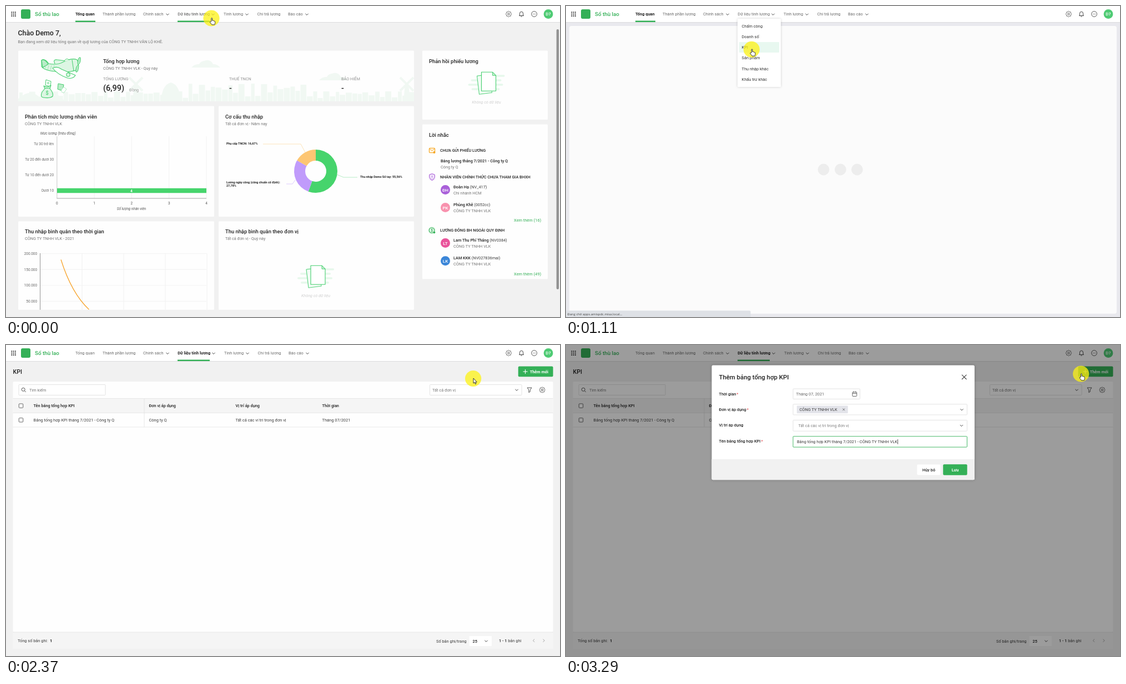
An HTML page with a canvas that plays this animation: 998 px wide and 561 px high, repeating every 3.33 s.

```html
<!DOCTYPE html>
<html lang="vi">
<head>
<meta charset="utf-8">
<title>KPI</title>
<style>
html, body { margin: 0; width: 100%; height: 100%; overflow: hidden; background: #f1f1f1; }
canvas { display: block; width: 998px; height: 561px; }
</style>
</head>
<body>
<canvas id="stage"></canvas>
<script>
const W = 998, H = 561, LOOP = 3330;
const canvas = document.getElementById('stage');
const c = canvas.getContext('2d');
const dpr = window.devicePixelRatio || 1;
canvas.width = W * dpr;
canvas.height = H * dpr;

const GREEN = '#34b057', INK = '#222', BODY = '#3c3c3c', GRAY = '#757575', LINE = '#e2e2e2';
const FACE = 'Roboto, "Noto Sans", sans-serif';
const COMPANY = 'CÔNG TY TNHH VLK', BRANCH = 'Công ty Q';

// y is the middle of the capital letters; returns the width
function text(s, x, y, size = 7.4, color = BODY, weight = 400, align = 'left', style = '', face = FACE) {
  c.font = `${style} ${weight} ${size}px ${face}`;
  c.textAlign = align;
  c.fillStyle = color;
  c.fillText(s, x, y + size * .355);
  return c.measureText(s).width;
}
function box(x, y, x2, y2, fill, r = 0, stroke, lw = .8) {
  c.beginPath();
  c.roundRect(x, y, x2 - x, y2 - y, r);
  if (fill) { c.fillStyle = fill; c.fill(); }
  if (stroke) { c.strokeStyle = stroke; c.lineWidth = lw; c.stroke(); }
}
function disc(x, y, r, fill, stroke, lw = 1) {
  c.beginPath();
  c.arc(x, y, r, 0, Math.PI * 2);
  if (fill) { c.fillStyle = fill; c.fill(); }
  if (stroke) { c.strokeStyle = stroke; c.lineWidth = lw; c.stroke(); }
}
function line(color, lw, ...p) {
  c.beginPath();
  for (let i = 0; i < p.length; i += 2) c.lineTo(p[i], p[i + 1]);
  c.strokeStyle = color;
  c.lineWidth = lw;
  c.stroke();
}
function shape(d, x, y, fill, stroke, lw = 1) {
  c.save();
  c.translate(x, y);
  const p = new Path2D(d);
  if (fill) { c.fillStyle = fill; c.fill(p); }
  if (stroke) { c.strokeStyle = stroke; c.lineWidth = lw; c.lineJoin = 'round'; c.stroke(p); }
  c.restore();
}
const chevron = (x, y, color = '#444') => line(color, 1, x - 2.6, y - 1.2, x, y + 1.4, x + 2.6, y - 1.2);
const cross = (x, y, r, color, lw) => {
  line(color, lw, x - r, y - r, x + r, y + r);
  line(color, lw, x - r, y + r, x + r, y - r);
};
function gear(x, y) {
  c.beginPath();
  for (let i = 0; i <= 64; i++) {
    const a = i / 64 * Math.PI * 2, r = 4.6 + .5 * Math.cos(8 * a);
    c.lineTo(x + r * Math.cos(a), y + r * Math.sin(a));
  }
  c.strokeStyle = '#444';
  c.lineWidth = .9;
  c.stroke();
  disc(x, y, 1.7, null, '#444', .9);
}

function header(kpi, hover) {
  box(0, 0, W, 29, '#fff');
  box(0, 29, W, 30, '#dcdcde');
  for (let i = 0; i < 9; i++) disc(10.3 + i % 3 * 3.3, 11.3 + (i / 3 | 0) * 3.3, 1.1, '#333');
  box(27, 6, 44, 23, GREEN, 3);
  text('Sổ thù lao', 52, 14.5, 9.8, GREEN, 500);
  const nav = [
    ['Tổng quan', 125], ['Thành phần lương', 174], ['Chính sách', 247, 291],
    ['Dữ liệu tính lương', 309.3, 373], ['Tính lương', 392, 434],
    ['Chi trả lương', 452.5], ['Báo cáo', 508, 542]
  ];
  const active = kpi ? 3 : 0;
  nav.forEach(([s, x, arrow], i) => {
    const dx = kpi && i > 3 ? 1 : 0, on = i === active;
    text(s, x + dx, 14.7, 7.4, on ? INK : hover && i === 3 ? '#444' : '#6b6b6b', on ? 700 : 400);
    if (arrow) chevron(arrow + (kpi && i > 2 ? 1 : 0), 15);
  });
  if (kpi || hover) box(309, 26.6, 367, 29, GREEN);
  if (!kpi) box(125, 26.6, 161, 29, GREEN);
  gear(905.5, 14.5);
  shape('M-4 3H4L3 1.5V-1.2A3 3 0 0 0-3-1.2V1.5ZM-1 4.6H1', 928.5, 14.5, null, '#444', 1);
  disc(951.5, 14.5, 4.9, null, '#444', .9);
  for (const d of [-2, 0, 2]) disc(951.5 + d, 14.5, .6, '#444');
  disc(977, 14.5, 8.4, '#4fcb74');
  text('D7', 977, 14.8, 7.6, '#fff', 500, 'center');
}

function skyline() {
  const tint = '#f1f8f3';
  c.save();
  c.beginPath();
  c.rect(22, 81, 713, 91);
  c.clip();
  for (let x = 24, i = 0; x < 735; i++) {
    const w = 6 + 5 * Math.abs(Math.sin(i * 2.3)), tall = x > 320 && x < 540 ? 26 : 12;
    box(x, 166 - tall * Math.abs(Math.sin(i * 1.7 + 1)), x + w, 172, tint);
    x += w + 1;
  }
  shape('M-18 32Q-16 2 0-2Q16 2 18 32Z', 297, 140, tint);
  shape('M-42 12Q-20-14 0 4Q26-14 46 12Z', 60, 160, tint);
  for (const [x, y] of [[360, 109], [590, 132]])
    shape('M-26 2H26Q20-5 13-4Q8-14-3-10Q-10-9-12-4Q-20-5-26 2Z', x, y, tint);
  for (const x of [234, 722]) {
    shape('M-3 0L-6 32H6L3 0Z', x, 140, tint);
    cross(x, 141, 12, tint, 4);
  }
  c.restore();
}

function plane() {
  const edge = '#43ce6d', pale = '#dcf6e3';
  shape('M64 98Q70 94 77 104Q92 107 103 101Q119 93 128 97Q134 107 126 116Q109 121 88 118Q68 116 64 109Z', 0, 0, pale, edge, 1.1);
  shape('M64 98Q69 94 76 105L66 111Z', 0, 0, '#b9ecc8', edge, 1.1);
  shape('M84 112Q92 108 100 114L125 125Q121 132 111 130Q93 124 84 112Z', 0, 0, '#fff', edge, 1.1);
  shape('M88 104Q84 96 92 97L108 99', 0, 0, pale, edge, 1.1);
  shape('M105 100Q107 93 114 97', 0, 0, '#fff', edge, 1);
  disc(112, 124, 3.2, pale, edge, 1.1);
  for (let i = 0; i < 4; i++) line('#a8e6ba', 1, 72 + i * 5, 107, 70 + i * 5, 115);
  line(edge, 1, 119, 97, 122, 117);
  shape('M0 0Q5-3 4-13Q0-15-1-3ZM0 0Q-5 4-4 13Q0 15 1 2Z', 130, 106, '#b9ecc8', edge, 1);
  shape('M71 143L72 133L81 136L80 145Z', 0, 0, '#fff', edge, 1);
  disc(76, 139, 1.5, null, edge, .8);
  shape('M68 144Q74 148 81 143L79 149Q86 157 84 163Q79 167 67 165Q61 164 65 155L70 149Z', 0, 0, pale, edge, 1.1);
  line(edge, 1, 70, 148.5, 80, 148);
  text('$', 74, 157, 9, edge, 500, 'center');
  shape('M94 140L104 142L102 153L93 150Z', 0, 0, '#b9ecc8', edge, 1);
  shape('M104 146L109 150L104 157L99 154', 0, 0, '#fff', '#a8e6ba', .9);
}

function empty(x, y) {
  const bars = [[-17, 33, -13], [-28, 27, -5], [-33, 30, 3], [-27, 24, 11]];
  for (const [a, b, d] of bars) box(x + a, y + d - 2, x + b, y + d + 1.5, '#e6f8eb', 2);
  shape('M-17-13L6-16L10 17L-13 20Z', x, y, '#f2fcf5', '#55d37c', 1.1);
  shape('M-9-20H11L17-14V14H-9Z', x, y, '#fff', '#43ce6d', 1.1);
  shape('M11-20V-14H17Z', x, y, '#c6f0d2', '#43ce6d', .9);
  text('Không có dữ liệu', x, y + 34.5, 7.2, '#cfcfcf', 400, 'center', 'italic');
}

function card(x, y, x2, y2, title, sub) {
  box(x, y, x2, y2, '#fefefe', 1.5);
  text(title, x + 12, y + 18.7, 9.4, INK, 500);
  if (sub) text(sub, x + 12, y + 31.6, 7.28, GRAY);
}

function barChart() {
  card(22, 180.5, 375, 380, 'Phân tích mức lương nhân viên', COMPANY);
  text('Mức lương (triệu đồng)', 62, 230, 6.4, '#555', 400, 'left', 'italic');
  for (let i = 0; i < 5; i++) {
    const x = 91.8 + i * 67.3;
    line(i ? '#efefef' : '#bbb', .8, x, 235, x, 347);
    text(i, x, 355.8, 6.4, '#555', 400, 'center');
  }
  line('#999', .9, 91.5, 347, 361, 347);
  ['Từ 30 trở lên', 'Từ 20 đến dưới 30', 'Từ 10 đến dưới 20', 'Dưới 10'].forEach((s, i) =>
    text(s, 86, 249 + i * 28, 6.4, '#666', 400, 'right'));
  box(92, 328.8, 361, 337.3, '#46d46c');
  text('4', 226, 333.2, 6.6, '#fff', 700, 'center');
  text('Số lượng nhân viên', 226, 366, 6.4, '#555', 400, 'center', 'italic');
}

function donut() {
  card(383, 180.5, 735, 380, 'Cơ cấu thu nhập', 'Tất cả đơn vị - Năm nay');
  const cx = 558, cy = 298, turn = Math.PI * 2;
  let a = -Math.PI / 2;
  for (const [part, color] of [[.5556, '#46d46c'], [.2778, '#c09bfb'], [.1666, '#fdc673']]) {
    const b = a + part * turn;
    c.beginPath();
    c.arc(cx, cy, 39, a, b);
    c.arc(cx, cy, 19, b, a, true);
    c.fillStyle = color;
    c.fill();
    a = b;
  }
  line('#a5e8b7', .8, 596, 304, 608, 309, 633, 309);
  line('#d4bdfb', .8, 521, 314, 516, 321, 505, 321);
  line('#fbdca8', .8, 539, 264, 531, 249, 463, 249);
  text('Thu nhập Demo Sổ tay: 55,56%', 638, 308, 5.45, INK, 700);
  text('Phụ cấp TNCN: 16,67%', 397, 248.3, 5.45, INK, 700);
  text('Lương ngày công (công chuẩn cố định):', 397, 317.7, 5.45, INK, 700);
  text('27,78%', 397, 323.7, 5.45, INK, 700);
}

function lineChart() {
  card(22, 388.3, 375, 548, 'Thu nhập bình quân theo thời gian', COMPANY + ' - 2021');
  for (let i = 0; i < 4; i++) {
    const y = 446.6 + i * 28.7;
    line('#efefef', .8, 62, y, 361, y);
    text((200 - i * 50) + '.000', 56, y, 6.4, '#666', 400, 'right');
    line('#efefef', .8, 137 + i * 75, 446, 137 + i * 75, 548);
  }
  line('#888', .9, 61.5, 446, 61.5, 548);
  shape('M99 457.5Q118 518 149.5 547.5', 0, 0, null, '#f7a32a', 1.3);
}

function person(y, initials, color, name, code, sub) {
  disc(791.5, y, 8.5, color);
  text(initials, 791.5, y + .3, 8, '#fff', 500, 'center');
  const w = text(name + ' ', 806, y - 4.8, 7.3, INK, 500);
  text(`(${code})`, 806 + w, y - 4.8, 7.3, BODY);
  text(sub, 806, y + 6.2, 7.3, GRAY);
}

function reminders() {
  card(750, 213.5, 976, 492.5, 'Lời nhắc');
  disc(767.5, 260.5, 7, '#fff7e8');
  box(762.5, 256.5, 772.5, 264.5, null, 1, '#f5a623', 1.1);
  line('#f5a623', 1, 763, 257.5, 767.5, 261, 772, 257.5);
  disc(771.5, 264, 2, '#f5a623');
  disc(767.5, 308.5, 7, '#f5ecfb');
  shape('M-4.5-4L0-5.5L4.5-4V0Q4 4 0 6Q-4 4-4.5 0ZM0-2.5V1M0 2V3', 767.5, 308.3, null, '#a95fd8', 1.1);
  disc(767.5, 405, 7, '#e6f8eb');
  disc(767, 404.5, 4.8, null, '#34b057', 1.1);
  text('$', 767, 404.6, 6.5, GREEN, 700, 'center');
  disc(771.5, 408.5, 1.8, GREEN);
  text('CHƯA GỬI PHIẾU LƯƠNG', 782, 260.3, 7.25, INK, 500);
  text('Bảng lương tháng 7/2021 - ' + BRANCH, 783, 279.8, 7.3, INK, 500);
  text(BRANCH, 783, 290.7, 7.3, GRAY);
  text('NHÂN VIÊN CHÍNH THỨC CHƯA THAM GIA BHXH', 782, 308.3, 7.25, INK, 500);
  person(331.5, 'ĐH', '#a960d9', 'Đoàn Hạ', 'NV_417', 'Chi nhánh HCM');
  person(363.5, 'PK', '#f892ae', 'Phùng Khê', '0052cc', COMPANY);
  text('Xem thêm (16)', 964, 386.7, 7.4, GREEN, 400, 'right');
  text('LƯƠNG ĐÓNG BH NGOÀI QUY ĐỊNH', 782, 404.5, 7.25, INK, 500);
  person(427.5, 'LT', '#e9549b', 'Lam Thu Phí Tháng', 'NV0384', COMPANY);
  person(459.7, 'LK', '#3b86d8', 'LAM KKK', 'NV027836mai', COMPANY);
  text('Xem thêm (49)', 964, 483, 7.4, GREEN, 400, 'right');
}

function dashboard() {
  box(0, 0, W, H, '#f1f1f1');
  text('Chào Demo 7,', 21.5, 48.8, 12.4, INK, 500);
  text('Bạn đang xem dữ liệu tổng quan về quỹ lương của CÔNG TY TNHH VÂN LỘ KHÊ.', 21.5, 64.8, 7.35, GRAY);
  box(22, 80.5, 735, 172, '#fefefe', 1.5);
  skyline();
  plane();
  text('Tổng hợp lương', 175, 99.7, 9.4, INK, 500);
  text(COMPANY + ' - Quý này', 175, 112.3, 7.28, GRAY);
  [['TỔNG LƯƠNG', 175], ['THUẾ TNCN', 402], ['BẢO HIỂM', 604]].forEach(([s, x], i) => {
    text(s, x, 131.5, 7.3, '#909090');
    text(i ? '-' : '(6,99)', x, 148.3, 14.5, INK, 500);
  });
  text('Đồng', 222, 151, 7.3, '#a0a0a0');
  barChart();
  donut();
  lineChart();
  card(383, 388.3, 735, 548, 'Thu nhập bình quân theo đơn vị', 'Tất cả đơn vị - Quý này');
  empty(558, 488.3);
  card(750, 80.5, 976, 205, 'Phản hồi phiếu lương');
  empty(865.5, 139.3);
  reminders();
  box(991.6, 42, 996, 511, '#929292', 2);
}

function loading() {
  box(0, 0, W, H, '#e9e9ee');
  box(6, 36, 992, 555, '#fbfbfb', 4);
  for (const x of [464, 494.4, 524.4]) disc(x, 295, 10.4, '#ededed');
  box(-4, 549.5, 332.5, 566, '#dee1e6', 2);
  text('Đang chờ apps.amispdc.misa.local...', 2.5, 555.8, 5.9, '#444', 400, 'left', '', '"Open Sans", sans-serif');
}

function menu(alpha, picked) {
  c.save();
  c.globalAlpha = alpha;
  c.shadowColor = 'rgba(0,0,0,.18)';
  c.shadowBlur = 4 * dpr;
  box(309, 23, 387, 146, '#fff', 1.5);
  c.shadowColor = 'transparent';
  ['Chấm công', 'Doanh số', 'KPI', 'Sản phẩm', 'Thu nhập khác', 'Khấu trừ khác'].forEach((s, i) => {
    const y = 36 + i * 19.25;
    if (i === picked) box(312, y - 9.5, 384, y + 9.5, '#e8f8f0', 1);
    text(s, 316.5, y, 7.4, '#333');
  });
  c.restore();
}

function kpiPage(t, buttonColor) {
  box(0, 0, W, H, '#f1f1f1');
  text('KPI', 12.5, 48, 10.6, INK, 500);
  box(922.7, 38.5, 985.5, 57.3, buttonColor, 2);
  line('#fff', 1.1, 931.5, 48, 939.5, 48);
  line('#fff', 1.1, 935.5, 44, 935.5, 52);
  text('Thêm mới', 943.7, 48, 7.3, '#fff', 700);
  box(12.5, 66, 985.5, 518, '#fefefe', 2);
  box(12.5, 96.5, 985.5, 122.5, '#f5f5f5');
  box(12.5, 518, 985.5, 548, '#f5f5f5');
  for (const y of [96.5, 122.5, 518]) line(LINE, .8, 12.5, y, 985.5, y);
  box(23, 71.5, 179, 90.5, '#fff', 1, '#dcdcdc');
  disc(31.2, 80.3, 3, null, '#444', .9);
  line('#444', .9, 33.3, 82.4, 35.8, 85);
  text('Tìm kiếm', 42, 81.2, 7.4, GRAY);
  box(763.5, 71.5, 929, 90.5, '#fff', 1, '#dcdcdc');
  text('Tất cả đơn vị', 768, 81, 7.4, GRAY);
  chevron(920, 81);
  shape('M-4-4H4L1.2 0V3.2L-1.2 4.6V0Z', 943, 81, null, '#444', .9);
  gear(966, 81);

  const cols = [49.5, 257.5, 413.5, 569.5];
  ['Tên bảng tổng hợp KPI', 'Đơn vị áp dụng', 'Vị trí áp dụng', 'Thời gian'].forEach((s, i) =>
    text(s, cols[i], 109.8, 7.3, INK, 500));
  box(23.3, 106, 30.7, 113.3, '#fff', 1, '#555', .9);
  const loaded = t >= 1490;
  if (loaded) {
    ['Bảng tổng hợp KPI tháng 7/2021 - ' + BRANCH, BRANCH, 'Tất cả các ví trí trong đơn vị', 'Tháng 07/2021']
      .forEach((s, i) => text(s, cols[i], 135.3, 7.45));
    box(23.3, 131.7, 30.7, 139, '#fff', 1, '#555', .9);
    line(LINE, .8, 12.5, 148, 985.5, 148);
  }
  line(LINE, .8, 249, 96.5, 249, loaded ? 148 : 122.5);

  text('Tổng số bản ghi:', 21, 533.8, 7.4);
  text(loaded ? '1' : '0', 79, 533.8, 7.4, INK, 700);
  text('Số bản ghi/trang', 775, 534, 7.4);
  box(834.5, 525, 875, 543, '#fff', 1);
  text('25', 840.5, 534.2, 7.4, INK, 500);
  chevron(865, 534);
  const w = text('1 - 1 ', 888, 533.8, 7.3, INK, 500);
  text('bản ghi', 888 + w, 533.8, 7.4);
  line('#999', .9, 952, 530.6, 949.4, 533.2, 952, 535.8);
  line('#999', .9, 967.5, 530.6, 970.1, 533.2, 967.5, 535.8);

  if (t < 1770) {
    const fade = Math.min(1, (1770 - t) / 270), a = -1.4 + (t - 1660) / 160;
    c.beginPath();
    c.arc(499, 307, 13, a, a + 2.2);
    c.strokeStyle = `rgba(170,180,175,${.6 * fade * fade})`;
    c.lineWidth = 1.1;
    c.stroke();
  }
}

function modal(alpha) {
  c.save();
  c.globalAlpha = alpha;
  box(0, 0, W, H, 'rgba(0,0,0,.39)');
  c.shadowColor = 'rgba(0,0,0,.25)';
  c.shadowBlur = 5 * dpr;
  box(262.5, 36.5, 736, 243.3, '#fff', 2.5);
  c.shadowColor = 'transparent';
  box(262.5, 206, 736, 243.3, '#f1f1f1', [0, 0, 2.5, 2.5]);
  text('Thêm bảng tổng hợp KPI', 275.5, 57.8, 11.4, INK, 500);
  cross(717.3, 57.8, 4.2, '#444', 1.1);
  [['Thời gian', 88, 1], ['Đơn vị áp dụng', 116, 1], ['Vị trí áp dụng', 144.5], ['Tên bảng tổng hợp KPI', 173.8, 1]]
    .forEach(([s, y, must]) => {
      const w = text(s, 275.5, y, 7.4, INK, 500);
      if (must) text('*', 276.5 + w, y, 7.4, '#e5484d');
    });
  box(409, 79, 529.5, 97.5, '#fff', 1, '#dcdcdc');
  text('Tháng 07, 2021', 414.5, 88, 7.4, '#666');
  box(516, 85, 523.8, 92.5, null, 1, '#555', .9);
  line('#555', .9, 516, 87.5, 523.8, 87.5);
  line('#555', .9, 518, 83.5, 518, 86);
  line('#555', .9, 521.8, 83.5, 521.8, 86);
  box(409, 106.8, 722.5, 126, '#fff', 1, '#dcdcdc');
  box(415.8, 109.5, 507.8, 123.2, '#e3e4ea', 1);
  text(COMPANY, 420.5, 116.4, 7.4);
  cross(500.3, 116.4, 1.9, '#555', .8);
  chevron(713, 116.5);
  box(409, 135.5, 722.5, 155.3, '#fff', 1, '#dcdcdc');
  text('Tất cả các vị trí trong đơn vị', 418.5, 145.3, 7.45, '#808080');
  chevron(712.5, 145.3);
  box(409, 164.8, 722.5, 184.2, '#fff', 1, GREEN, .9);
  const w = text('Bảng tổng hợp KPI tháng 7/2021 - ' + COMPANY, 416, 174.5, 7.4);
  line('#222', .7, 416.7 + w, 170, 416.7 + w, 179);
  box(632.5, 215.5, 674.5, 234.6, '#fff', 2);
  text('Hủy bỏ', 653.5, 225, 7.4, INK, 500, 'center');
  box(679.3, 215.3, 722.7, 234.8, GREEN, 2);
  text('Lưu', 701, 225, 7.4, '#fff', 700, 'center');
  c.restore();
}

// time, x, y of the pointer
const PATH = [
  [180, 370, 22], [300, 367, 26], [450, 356, 44], [600, 346, 62], [700, 343, 68],
  [740, 343, 68], [850, 334.3, 78.3],
  [1900, 334.3, 78.3], [1970, 365, 82], [2050, 450, 81], [2370, 841, 60.5], [2440, 884, 59.5],
  [2480, 884, 59.5], [2580, 915, 56], [2700, 927.7, 52]
];
function pointerAt(t) {
  if (t <= PATH[0][0]) return PATH[0].slice(1);
  for (let i = 1; i < PATH.length; i++) {
    const [t0, x0, y0] = PATH[i - 1], [t1, x1, y1] = PATH[i];
    if (t < t1) {
      const u = (t - t0) / (t1 - t0);
      return [x0 + (x1 - x0) * u, y0 + (y1 - y0) * u];
    }
  }
  return PATH[PATH.length - 1].slice(1);
}
const HAND = 'M-.2 6V.5a.9.9 0 0 1 1.8 0V4.2q1.5-.6 1.7.5q1.5-.5 1.7.6q1.6-.2 1.6 1.2V8.5q0 1.5-.9 3.3H1Q-.6 9.8-2.6 7.2q-.2-1.2 1-1z';
const ARROW = 'M.4-.5V8.6L2.5 6.8 3.9 10 5.3 9.4 4 6.4H6.6Z';
function pointer(x, y, hand) {
  disc(x, y, 14.6, 'rgba(252,242,20,.75)');
  shape(hand ? HAND : ARROW, x, y, '#fff', '#222', .9);
}

function draw(t) {
  c.setTransform(dpr, 0, 0, dpr, 0, 0);
  const [x, y] = pointerAt(t), kpi = t >= 1370, overButton = x > 922;
  if (kpi) {
    const color = t >= 3220 ? GREEN : t >= 2880 ? '#14883a' : overButton ? '#2ca14d' : GREEN;
    kpiPage(t, color);
  } else if (t >= 1110) loading();
  else dashboard();
  header(kpi, t < 180);
  if (t >= 180 && !kpi) menu(Math.min(1, (t - 140) / 120), y < 27 ? -1 : y < 46 ? 0 : y < 69 ? 1 : 2);
  if (t >= 3220) modal(t >= 3290 ? 1 : t >= 3255 ? .7 : .35);
  pointer(x, y, t < 1920 || overButton);
}

const start = performance.now();
function tick() {
  draw((performance.now() - start) % LOOP);
  requestAnimationFrame(tick);
}
tick();
</script>
</body>
</html>
```
